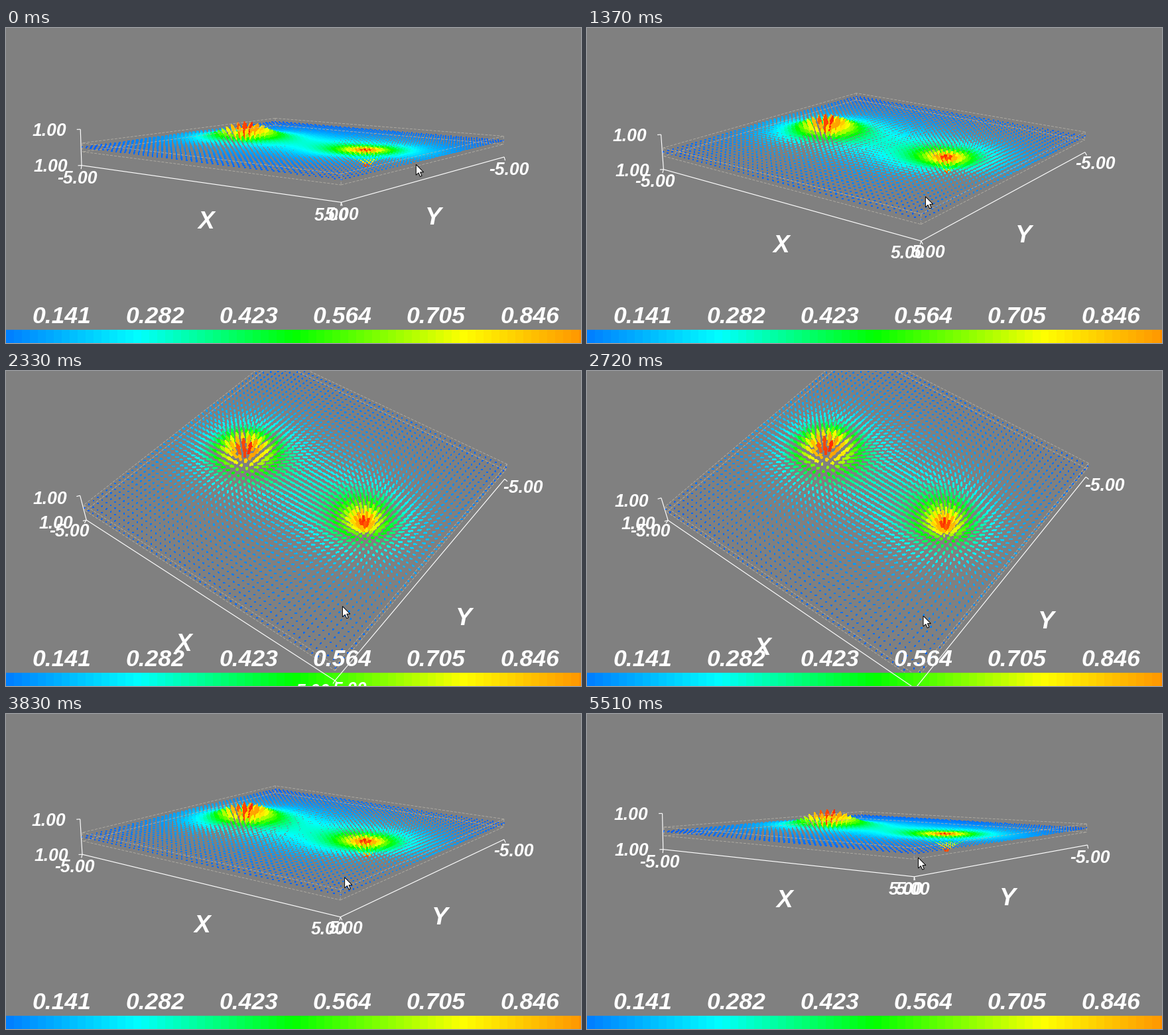
A matplotlib script that plays this animation: 867x476 px, repeating every 5.59 s.

```python
import numpy as np
import matplotlib.pyplot as plt
from matplotlib.animation import FuncAnimation
from matplotlib.collections import LineCollection, PolyCollection
from matplotlib.colors import hsv_to_rgb

W, H, DPI = 867, 476, 100
PT = 72 / DPI
LOOP, STEP, POSES = 5590, 43, 70
FRAMES = LOOP // STEP

# camera
CX, CY, FOCAL, DIST, LIFT, ROLL = 443.8, 176.4, 1323.5, 29.2, 0.035, 0.002


def pose(k):
    """Pointer position, elevation and azimuth at refresh k."""
    elev = np.interp(k, [8, 17, 25, 32, 34, 41, 48, 56, 58, 61, 69],
                     [7.5, 16.1, 38.1, 51.5, 50, 33.2, 13.8, -0.5, -14, -12.6, 5])
    glide = np.interp(k, [0, 1, 3, 6], [107, 41, 41, 0])
    swing = np.clip((k - 60) / 9, 0, 1)
    pointer = (512 - 0.1 * elev - 12 * swing + glide, 200 + 3.4 * elev - 0.18 * glide)
    return pointer, elev, 8.5 - 0.014 * elev - 1.7 * swing


def colour(v):
    """Rainbow from blue through green to red."""
    hue = np.interp(v, [0, 0.056, 0.256, 0.49, 0.745, 0.923, 0.987],
                    [0.63, 0.585, 0.5, 0.333, 0.167, 0.098, 0.02])
    return hsv_to_rgb(np.stack([hue, np.ones_like(hue), np.ones_like(hue)], -1))


def project(pts, elev, azim):
    """Screen positions and distances of world points."""
    x, y, z = np.asarray(pts, float).T
    phi, e = np.radians(45 - azim), np.radians(elev)
    z = z + LIFT
    u = x * np.cos(phi) - y * np.sin(phi)
    w = x * np.sin(phi) + y * np.cos(phi)
    depth = DIST - w * np.cos(e) - z * np.sin(e)
    sx = FOCAL * u / depth
    sy = FOCAL * (w * np.sin(e) - z * np.cos(e)) / depth + ROLL * sx
    return np.column_stack([CX + sx, CY + sy]), depth


def normal(p, q):
    d = q - p
    return np.array([-d[1], d[0]]) / np.hypot(*d)


def charge(pts, x, y, h=0.75, power=1.5):
    """Unit field pointing away from a charge buried at depth h."""
    r = pts - np.array([x, y, -h])
    d = np.linalg.norm(r, axis=1)[:, None]
    return r / d * (h / d) ** power


# a source and a sink under a flat grid
SCALE = 0.57
g = np.linspace(-5, 5, 51)
gx, gy = np.meshgrid(g, g)
tails = np.column_stack([gx.ravel(), gy.ravel(), np.zeros(gx.size)])
field = charge(tails, -2.5, -0.12) - charge(tails, 2.5, -0.12)
mag = np.linalg.norm(field, axis=1)
heads = tails + SCALE * field
shades = colour(mag)


def arrow_shapes(elev, azim):
    p, depth = project(tails, elev, azim)
    q, _ = project(heads, elev, azim)
    d = q - p
    n = np.column_stack([-d[:, 1], d[:, 0]])
    n /= np.maximum(np.hypot(*d.T), 1e-6)[:, None]
    n *= (SCALE * mag * FOCAL / depth)[:, None]
    s, t, m = 0.045 * n, 0.1 * n, p + 0.65 * d
    verts = np.stack([p + s, m + s, m + t, q, m - t, m - s, p - s], axis=1)
    order = np.argsort(-depth)
    return verts[order], shades[order]


# outline box and axis frame
BOX = [(x, y, z) for z in (0.142, -0.142) for x, y in ((-5, 5), (5, 5), (5, -5), (-5, -5))]
EDGES = [(i + k, (i + 1) % 4 + k) for k in (0, 4) for i in range(4)]
EDGES += [(i, i + 4) for i in range(4)]
A, Z = 5.03, 0.585
FRAME = [(-A, A, Z), (-A, A, -Z), (A, A, -Z), (A, -A, -Z)]

fig = plt.figure(figsize=(W / DPI, H / DPI), dpi=DPI, facecolor="#808080")
ax = fig.add_axes([0, 0, 1, 1])
ax.axis("off")

BAND = 12
bx = np.arange(0, W, BAND)
ax.imshow(colour(0.056 + (bx + BAND / 2) * 0.001)[None], aspect="auto",
          extent=(0, len(bx) * BAND, H, 456), interpolation="nearest", zorder=4)
ax.set_xlim(0, W)
ax.set_ylim(H, 0)


def place(t, xy):
    t.set_position((xy[0], xy[1] + t.drop))


def label(s, size=26.5, xy=(0, 0)):
    t = ax.text(0, 0, s, size=size * PT, color="white", family="Liberation Sans",
                weight="bold", style="italic", ha="center", va="baseline", zorder=6)
    t.drop = 0.35 * size
    place(t, xy)
    return t


for k in range(6):
    label(f"{0.141 * (k + 1):.3f}", 35.5, (84 + 141.1 * k, 434))

arrows = ax.add_collection(PolyCollection([], linewidths=PT, antialiaseds=False, zorder=2))
box = ax.add_collection(LineCollection([], colors="#b6b2a8", linewidths=0.8 * PT,
                                       linestyles=[(0, (5, 2.5))], zorder=3))
axes = ax.add_collection(LineCollection([], colors="white", linewidths=1.15 * PT,
                                        zorder=5))

z_top, z_low = label("1.00"), label("1.00")
x_lo, x_hi = label("-5.00"), label("5.00")
y_lo, y_hi = label("-5.00"), label("5.00")
x_title, y_title = label("X", 37), label("Y", 37)

POINTER = np.array([(0, 0), (0, 16), (3.8, 12.6), (6.3, 18.2), (8.8, 17.1),
                    (6.4, 11.6), (11.4, 11.6)])
cursor = plt.Polygon(POINTER, facecolor="white", edgecolor="black",
                     linewidth=PT, zorder=7)
ax.add_patch(cursor)


def draw(i):
    k = min((i + 1) * POSES // FRAMES, POSES - 1)
    pointer, elev, azim = pose(k)
    cursor.set_xy(POINTER + pointer)

    verts, shade = arrow_shapes(elev, azim)
    arrows.set_verts(verts)
    arrows.set_facecolor(shade)
    arrows.set_edgecolor(shade)

    b, _ = project(BOX, elev, azim)
    box.set_segments([b[list(e)] for e in EDGES])

    top, left, front, right = project(FRAME, elev, azim)[0]
    nz, nx, ny = normal(top, left), normal(left, front), normal(front, right)
    ends = [(top, nz), (left, nz), (left, nx), (front, nx), (front, ny), (right, ny)]
    axes.set_segments([[top, left], [left, front], [front, right]]
                      + [[p, p + 5.5 * n] for p, n in ends])

    place(z_top, top + nz * (47, 14))
    place(z_low, left + nz * (47, 14))
    place(x_lo, left + nx * (47, 18))
    place(x_hi, front + nx * (47, 18) + (-8, 0))
    place(y_hi, front + ny * (43, 18) + (-10, 0))
    place(y_lo, right + ny * (40, 18) + (-3, 0))
    tilt = max(np.sin(np.radians(elev)), 0)
    place(x_title, (left + front) / 2 + nx * (51 + 34 * tilt))
    place(y_title, (front + right) / 2 + ny * (51 + 49 * tilt))
    return arrows, box, axes, cursor


anim = FuncAnimation(fig, draw, frames=FRAMES, interval=STEP,
                     repeat=True, repeat_delay=0, blit=False)
plt.show()
```
